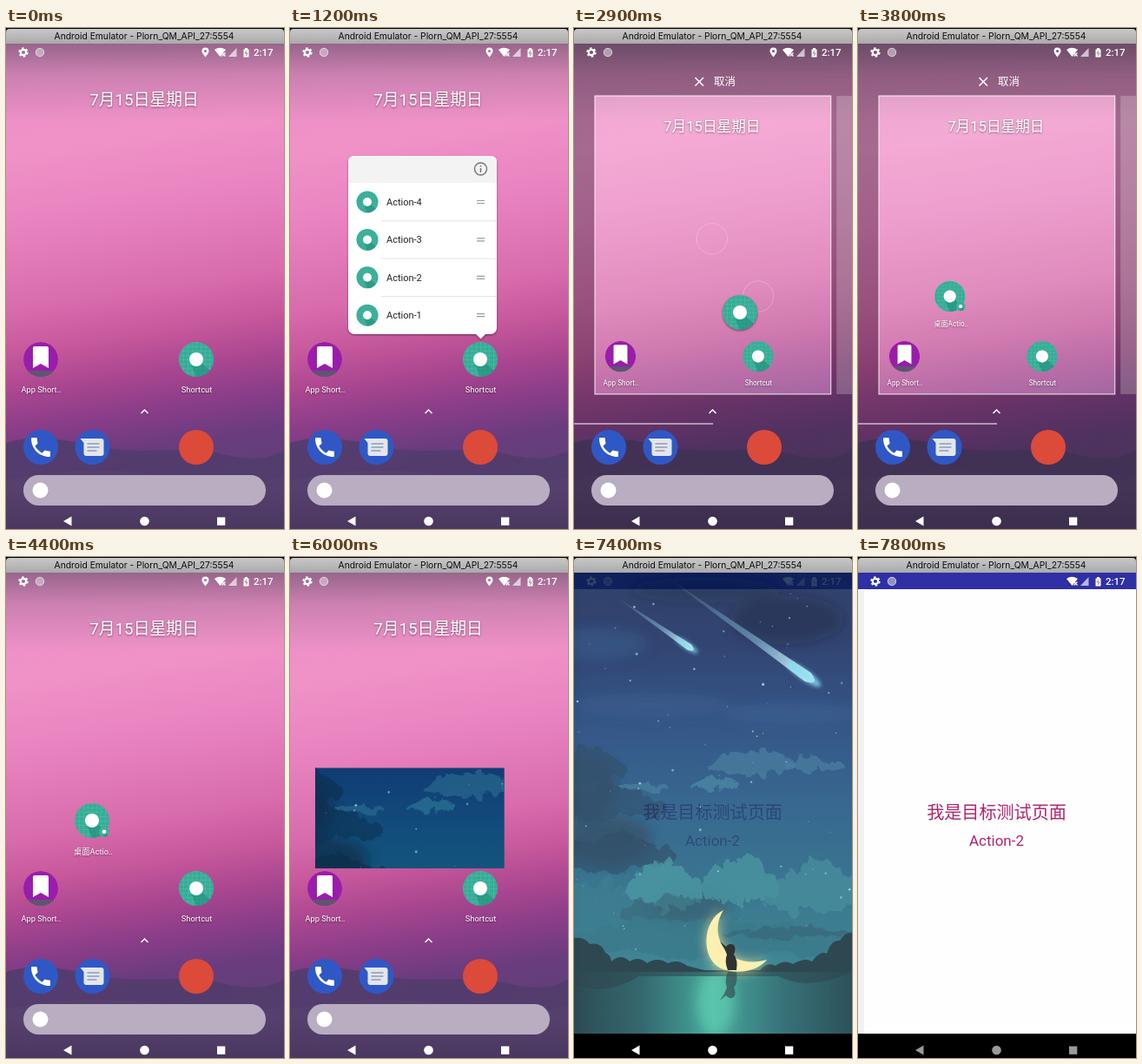
These frames come from a looping animation (320 px wide and 576 px high, 7.9 s). An HTML page:

```html
<!DOCTYPE html>
<html lang="zh-CN">
<head>
<meta charset="utf-8">
<title>Pinned shortcuts</title>
<style>
  html, body { margin: 0; width: 100%; height: 100%; overflow: hidden; background: #000; }
  svg { display: block; width: 100%; height: 100%; }
  text { font-family: Roboto, "Noto Sans CJK SC", "Noto Sans CJK", sans-serif; }
  .label { font-size: 9.3px; fill: #fff; text-anchor: middle; }
  .shade { filter: drop-shadow(0 1px 1px rgba(0,0,0,.45)); }
</style>
</head>
<body>
<svg id="stage" viewBox="0 0 320 576" preserveAspectRatio="none"></svg>
<script>
const LOOP = 7900;
const clamp = v => Math.max(0, Math.min(1, v));
const span = (t, start, length) => clamp((t - start) / length);
const smooth = p => p * p * (3 - 2 * p);
const lerp = (a, b, p) => a + (b - a) * p;
const at = (x, y, body) => `<g transform="translate(${x} ${y})">${body}</g>`;

const gradient = (id, stops, box = 'x1="0" y1="0" x2="0" y2="1"') =>
  `<linearGradient id="${id}" ${box}>${stops.map(([o, c, a = 1]) =>
    `<stop offset="${o}" stop-color="${c}" stop-opacity="${a}"/>`).join('')}</linearGradient>`;

function random(seed) {
  return () => (seed = (seed * 16807) % 2147483647) / 2147483647;
}

// Puffy cloud built from overlapping ellipses; its rim is roughened by a filter.
function cloud(x, y, w, h, color, opacity, seed) {
  const rnd = random(seed);
  let puffs = '';
  for (let i = 0; i < 9; i++) {
    const u = (i + .5) / 9, bulge = Math.sin(Math.PI * u);
    const ry = h * (.18 + .28 * bulge * (.5 + .6 * rnd()));
    puffs += `<ellipse cx="${x + w * u}" cy="${y + h * (.62 - .25 * bulge * rnd())}" rx="${w * (.07 + .07 * rnd())}" ry="${ry}"/>`;
  }
  return `<g fill="${color}" opacity="${opacity}" filter="url(#ragged)">${puffs}</g>`;
}

const defs = `<defs>
  ${gradient('wall', [[0, '#e88fc8'], [.2, '#f092c8'], [.36, '#e983c0'], [.54, '#d86cac'], [.64, '#c5579b'], [.72, '#aa4690'], [.8, '#8a3d88'], [.88, '#6a3c7e'], [1, '#5a4275']],
    'gradientUnits="userSpaceOnUse" x1="120" y1="18" x2="200" y2="540"')}
  ${gradient('topShade', [[0, '#3a3444', .46], [.4, '#3a3444', .17], [1, '#3a3444', 0]])}
  ${gradient('navShade', [[0, '#100c1c', 0], [1, '#100c1c', .16]])}
  ${gradient('bar', [[0, '#c8c8c8'], [1, '#aaaaaa']])}
  ${gradient('sky', [[0, '#0a1f4c'], [.16, '#0b2258'], [.32, '#0f3571'], [.5, '#124b7b'], [.68, '#155c7b'], [.86, '#1c7080'], [1, '#1c7080']])}
  ${gradient('water', [[0, '#062a34'], [.25, '#0e4d55'], [.5, '#24988a'], [.75, '#125860'], [1, '#06303a']], 'x1="0" y1="0" x2="1" y2="0"')}
  ${gradient('tail', [[0, '#8fd8f0', 0], [.6, '#7fc8ea', .5], [1, '#dffaff', 1]], 'x1="0" y1="0" x2="1" y2="0"')}
  <pattern id="mesh" width="5" height="5" patternUnits="userSpaceOnUse">
    <path d="M0 0H5M0 0V5" stroke="#8ad6c6" stroke-width=".6" opacity=".6"/></pattern>
  <filter id="soft" x="-50%" y="-50%" width="200%" height="200%"><feGaussianBlur stdDeviation="7"/></filter>
  <filter id="haze" x="-30%" y="-200%" width="160%" height="500%"><feGaussianBlur stdDeviation="2"/></filter>
  <filter id="ragged" x="-20%" y="-20%" width="140%" height="140%">
    <feTurbulence type="fractalNoise" baseFrequency=".06" numOctaves="3" seed="5" result="noise"/>
    <feDisplacementMap in="SourceGraphic" in2="noise" scale="16" xChannelSelector="R" yChannelSelector="G"/>
    <feGaussianBlur stdDeviation=".7"/></filter>
  <clipPath id="revealClip"><rect id="reveal"/></clipPath>
  <clipPath id="popupClip"><rect id="popupReveal" x="50" width="205"/></clipPath>
  <clipPath id="round20"><circle r="20"/></clipPath>
</defs>`;

const appIcon = (r = 20) => `<g transform="scale(${r / 20})">
  <circle r="20" fill="#36ad96"/><circle r="20" fill="url(#mesh)"/>
  <path d="M7 5L20 16V20H0L-6 6Z" fill="#1c8674" opacity=".5" clip-path="url(#round20)"/>
  <circle r="8" fill="#fff"/></g>`;

const bookmarkIcon = `<g clip-path="url(#round20)"><circle r="20" fill="#9a1cab"/>
  <rect x="-20" y="13" width="40" height="8" fill="#5c5670"/></g>
  <path d="M-7-15H7Q9-15 9-13V10L0 5L-9 10V-13Q-9-15-7-15Z" fill="#fff"/>`;

const phoneIcon = `<circle r="20" fill="#2f58c6"/>
  <path transform="translate(-14.6 -14.6) scale(1.22)" fill="#fff" d="M6.6 10.8c1.4 2.8 3.8 5.1 6.6 6.6l2.2-2.2c.3-.3.7-.4 1-.2 1.1.4 2.3.6 3.6.6.6 0 1 .4 1 1V20c0 .6-.4 1-1 1C10.6 21 3 13.4 3 4c0-.6.4-1 1-1h3.500c.6 0 1 .4 1 1 0 1.3.2 2.5.6 3.6.1.3 0 .7-.2 1z"/>`;

const messageIcon = `<circle r="20" fill="#2f58c6"/>
  <path d="M-14-10H10Q13-10 13-7V7Q13 10 10 10H-7Q-10 10-10 7V-5Z" fill="#e3e6ec"/>
  <path d="M-6-4H8M-6 0H8M-6 4H5" stroke="#a3aec6" stroke-width="2"/>`;

const statusRight = `<g fill="#fff">
  <path d="M240 25Q246 20.5 253 25L246.5 33Z"/><path d="M248.5 28.5l4 4m0-4l-4 4" stroke="#fff" stroke-width="1.3"/>
  <path d="M256 33L265.5 23V33Z" opacity=".65"/>
  <path d="M273.5 24.5H275V23H278V24.5H279.5V33.5H273.5Z"/><path d="M277 26l-2 3h3l-2 3" stroke="#765" fill="none" stroke-width=".8"/>
  <text x="285" y="32" font-size="11.5" font-weight="500">2:17</text></g>`;

const statusLeft = `<g transform="translate(20 28)" fill="none" stroke="#fff">
    <circle r="3.2" stroke-width="2.2"/>
    <circle r="4.8" stroke-width="1.8" stroke-dasharray="2.5 2.527"/></g>
  <circle cx="39" cy="28" r="5" fill="#d8d2de" opacity=".6"/><circle cx="39" cy="28" r="4.7" fill="none" stroke="#fff" stroke-width=".8" opacity=".7"/>`;

const locationPin = `<path fill="#fff" fill-rule="evenodd" d="M229.5 33.5C227 30 225.5 28.5 225.5 26.5A4 4 0 0 1 233.5 26.5C233.5 28.5 232 30 229.5 33.5ZM231 26.5A1.5 1.5 0 1 0 228 26.5A1.5 1.5 0 1 0 231 26.5Z"/>`;

const popupRows = [4, 3, 2, 1].map((n, i) => {
  const y = 200 + i * 43.4;
  return `${at(89, y, appIcon(12.5))}
    <text x="111" y="${y + 4}" font-size="11" fill="#222">Action-${n}</text>
    <path d="M215 ${y - 1.5}h9m-9 3h9" stroke="#999" stroke-width="1.2"/>
    ${i ? `<path d="M105 ${y - 21.7}H238" stroke="#e3e3e3"/>` : ''}`;
}).join('');

const popup = `<g id="popup" clip-path="url(#popupClip)"><g class="shade">
  <rect x="67" y="147" width="171" height="205" rx="7" fill="#fff"/><path d="M214 352H225L219.5 357.5Z" fill="#fff"/></g>
  <path d="M67 178V154Q67 147 74 147H231Q238 147 238 154V178Z" fill="#f3f3f3"/>
  <circle cx="219.5" cy="162" r="7" fill="none" stroke="#757575" stroke-width="1.4"/>
  <path d="M219.5 161V166M219.5 158V159.5" stroke="#757575" stroke-width="1.5"/>
  ${popupRows}</g>`;

const outlines = [[159, 228], [219, 303], [99, 303]].map(([x, y], i) =>
  `<circle id="cell${i}" cx="${x}" cy="${y}" r="20" fill="none" stroke="#fff" stroke-width="1"/>`).join('');

const home = `<rect y="18" width="320" height="558" fill="url(#wall)"/>
  <path d="M0 477C25 469 55 470 105 481S205 479 245 489S300 495 320 486V576H0Z" fill="#513c6c" opacity=".85"/>
  <path d="M0 520Q90 500 180 515T320 516V576H0Z" fill="#5b446f" opacity=".5"/>
  <rect y="18" width="320" height="90" fill="url(#topShade)"/>
  <rect y="530" width="320" height="46" fill="url(#navShade)"/>
  <path id="scrim" fill="#22202a" fill-rule="evenodd"/>
  <g id="workspace">
    <g id="panels" fill="#fff" fill-opacity=".22">
      <rect x="6.7" y="42.5" width="307" height="387.5" stroke="#fff" stroke-opacity=".85" stroke-width="1.2"/>
      <rect x="321" y="42.5" width="307" height="387.5"/>
      ${outlines}
    </g>
    <text class="shade" x="159" y="89" font-size="18.8" fill="#fff" text-anchor="middle">7月15日星期日</text>
    ${at(40, 381, bookmarkIcon)}<text class="label shade" x="40.5" y="419">App Short..</text>
    ${at(219, 381, appIcon())}<text class="label shade" x="219.5" y="419">Shortcut</text>
    <g id="pinned">${at(99, 303, appIcon())}${at(113, 316, appIcon(6))}
      <text class="label shade" x="100.5" y="342">桌面Actio..</text></g>
  </g>
  <g id="cancel"><path d="M139.5 57l9.5 9.5m0-9.5l-9.5 9.5" stroke="#fff" stroke-width="1.5"/>
    <text x="161" y="66" font-size="12.5" fill="#fff">取消</text>
    <path d="M0 455H160" stroke="#fff" stroke-width="1.2"/></g>
  <path d="M155.5 443L159.5 439L163.5 443" fill="none" stroke="#fff" stroke-width="1.5"/>
  ${at(40, 482, phoneIcon)}${at(99.5, 482, messageIcon)}
  <circle cx="219" cy="482" r="20" fill="#dc4a3a"/>
  <rect x="20" y="514" width="279" height="35" rx="17.5" fill="#b9adc1"/>
  <circle cx="39.5" cy="531.5" r="9" fill="#fff"/>
  ${statusLeft}${locationPin}${statusRight}
  ${popup}<g id="drag" class="shade">${appIcon()}</g>`;

function stars() {
  const rnd = random(4217);
  let out = '';
  for (let i = 0; i < 85; i++) {
    out += `<circle cx="${320 * rnd()}" cy="${24 + 510 * rnd()}" r="${.5 + 1.1 * rnd() ** 2}" opacity="${.25 + .5 * rnd()}"/>`;
  }
  return `<g fill="#cdeef5">${out}</g>`;
}

function meteor(x1, y1, x2, y2, width) {
  const length = Math.hypot(x2 - x1, y2 - y1);
  const angle = Math.atan2(y2 - y1, x2 - x1) * 180 / Math.PI;
  return `<g transform="translate(${x1} ${y1}) rotate(${angle})">
    <path d="M0 0L${length - width * 2} ${-width}Q${length + width} 0 ${length - width * 2} ${width}Z" fill="url(#tail)"/>
    <ellipse cx="${length - width * 3}" rx="${width * 4}" ry="${width}" fill="#6fd8ee" opacity=".8" filter="url(#haze)"/></g>`;
}

const hills = 'M0 477V438Q12 436 18 445Q32 442 36 455Q42 457 43 465Q54 455 64 465Q74 458 84 467Q96 459 108 467Q120 462 130 470L150 475H214Q222 465 232 470Q242 462 252 468Q266 460 274 465Q284 452 291 456Q296 440 306 441Q312 431 320 432V477Z';
const moon = 'M172 406C148 417 145 461 169 473C190 481 213 475 222 463C206 468 186 466 175 453C163 438 163 420 172 406Z';
const figure = 'M168 442L175 448Q178 443 184 446Q187 451 184 457Q189 463 187 475H177Q173 465 176 457L173 450Z';

const night = `<rect y="18" width="320" height="530" fill="url(#sky)"/>
  <g filter="url(#soft)" fill="#06133a">
    <ellipse cx="245" cy="72" rx="65" ry="28" opacity=".8"/><ellipse cx="150" cy="38" rx="85" ry="15" opacity=".55"/>
    <ellipse cx="25" cy="100" rx="60" ry="18" fill="#15427a" opacity=".5"/>
    <ellipse cx="90" cy="170" rx="90" ry="14" fill="#14427f" opacity=".5"/>
    <ellipse cx="250" cy="180" rx="80" ry="12" fill="#144684" opacity=".5"/>
    <ellipse cx="10" cy="265" rx="40" ry="38" fill="#0d2b4d" opacity=".8"/>
    <ellipse cx="40" cy="325" rx="50" ry="28" fill="#0c2f4e" opacity=".8"/>
    <ellipse cx="135" cy="400" rx="45" ry="20" fill="#0f3f58" opacity=".7"/></g>
  ${cloud(-20, 215, 75, 45, '#0f3153', .7, 31)}${cloud(-20, 262, 125, 45, '#0e3152', .6, 55)}${cloud(-20, 315, 130, 50, '#0c2d4b', .6, 71)}
  ${cloud(160, 217, 92, 38, '#29688f', .7, 11)}${cloud(245, 229, 62, 20, '#29688f', .7, 19)}
  ${cloud(136, 253, 54, 16, '#2c7395', .75, 23)}${cloud(58, 257, 46, 13, '#2c6c90', .7, 29)}
  ${cloud(-10, 366, 75, 60, '#1f657d', .7, 61)}${cloud(62, 345, 80, 65, '#2b8693', .8, 7)}
  ${cloud(150, 338, 80, 70, '#2b8491', .75, 43)}${cloud(220, 350, 115, 66, '#277a8b', .75, 83)}
  ${cloud(60, 385, 110, 40, '#124c62', .6, 37)}
  ${cloud(-10, 410, 340, 54, '#196173', .75, 97)}
  ${cloud(180, 424, 150, 16, '#124a62', .7, 101)}
  ${stars()}
  ${meteor(105, 22, 279, 145, 6)}${meteor(47, 45, 139, 108, 3.8)}
  <rect y="475" width="320" height="73" fill="url(#water)"/>
  <ellipse cx="163" cy="512" rx="22" ry="38" fill="#4cd0a8" opacity=".6" filter="url(#soft)"/>
  <path d="${hills}" fill="#062530"/>
  <path d="M0 477H320Q270 500 235 482H75Q40 505 0 492Z" fill="#062530" opacity=".6"/>
  <path d="${moon}" fill="#f5e98a" opacity=".8" filter="url(#soft)"/>
  <path d="${moon}" fill="#fbeea0"/>
  <path d="${figure}" fill="#090b0c"/>
  <path d="${figure}" transform="matrix(1 0 0 -1 0 952)" fill="#0a2c30" opacity=".7"/>`;

const page = `<rect y="18" width="320" height="20" fill="#2f2fa6"/>
  <rect y="37" width="320" height="511" fill="#fefefe"/><rect y="38" width="7" height="510" fill="#f2f2f2"/>
  ${statusLeft}${statusRight}
  <g fill="#b0246c" text-anchor="middle"><text x="159.5" y="301" font-size="20.1">我是目标测试页面</text>
  <text x="159.5" y="332" font-size="17">Action-2</text></g>`;

const frame = `<path d="M0 0H320V18H0Z" fill="#000"/>
  <path d="M0 18V5Q0 1 4 1H316Q320 1 320 5V18Z" fill="url(#bar)"/>
  <text x="159" y="13" font-size="10.3" fill="#0c0c0c" text-anchor="middle" style="font-family:Inter,sans-serif">Android Emulator - Plorn_QM_API_27:5554</text>
  <rect id="navBack" y="548" width="320" height="28" fill="#000"/>
  <g id="nav"><path d="M66 567L75.5 561.5V572.5Z"/><circle cx="159.5" cy="567" r="5.3"/><rect x="243" y="562.5" width="9.3" height="9.3"/></g>`;

document.getElementById('stage').innerHTML = `${defs}${home}
  <g id="splash" clip-path="url(#revealClip)"><g id="scene">${night}</g></g>
  <g id="page">${page}</g>${frame}`;

const parts = {};
document.querySelectorAll('[id]').forEach(node => parts[node.id] = node);
function set(id, attributes) {
  for (const key in attributes) parts[id].setAttribute(key, attributes[key]);
}
const show = (id, opacity) => set(id, { opacity, display: opacity > 0 ? 'inline' : 'none' });

// Time and position of the dragged icon.
const dragPath = [[2250, 140, 287], [2550, 161, 255], [2900, 191, 327], [3450, 112, 312], [3750, 106, 308]];
function dragPoint(t) {
  const i = Math.max(1, dragPath.findIndex(p => p[0] >= t));
  const [a, b] = [dragPath[i - 1], dragPath[i]];
  const p = smooth(span(t, a[0], b[0] - a[0]));
  return [lerp(a[1], b[1], p), lerp(a[2], b[2], p)];
}

function drawHome(t) {
  const open = smooth(span(t, 750, 250)), close = span(t, 2250, 150);
  const top = lerp(357, 140, open);
  set('popupReveal', { y: top, height: 362 - top });
  show('popup', Math.min(1, open * 2) * (1 - close));

  const edit = smooth(span(t, 2300, 250)) * (1 - smooth(span(t, 3800, 280)));
  const scale = lerp(1, .885, edit), dx = 18.1 * edit, dy = 40.4 * edit;
  set('workspace', { transform: `translate(${dx} ${dy}) scale(${scale})` });
  const px = x => x * scale + dx, py = y => y * scale + dy;
  set('scrim', { d: `M0 18H320V576H0ZM${px(6.7)} ${py(42.5)}H${px(313.7)}V${py(430)}H${px(6.7)}Z` });
  show('scrim', .36 * edit);
  show('panels', edit);
  show('cancel', edit);
  [2400, 2700, 3200].forEach((start, i) =>
    show('cell' + i, .35 * span(t, start, 250) * (1 - span(t, start + 450, 250))));

  const dragging = t >= 2250 && t < 3750;
  show('drag', dragging ? 1 : 0);
  if (dragging) set('drag', { transform: `translate(${dragPoint(t)})` });
  show('pinned', t >= 3750 ? 1 : 0);
}

function drawLaunch(t) {
  const wide = 1 - (1 - span(t, 5905, 200)) ** 1.55;
  const tall = smooth(span(t, 5905, 380));
  const left = lerp(80, 0, wide), top = lerp(285, 18, tall);
  set('reveal', { x: left, y: top, width: lerp(118, 320, wide) - left, height: lerp(322, 548, tall) - top });
  set('scene', { transform: `translate(0 ${30 * (1 - tall)})` });
  show('splash', t >= 5905 ? 1 : 0);
  show('navBack', span(t, 6150, 130));

  const enter = smooth(span(t, 7350, 200));
  show('page', enter);
  set('nav', { fill: enter > .5 ? '#9a9a9a' : '#fff' });
}

function draw(now) {
  const t = now % LOOP;
  drawHome(t);
  drawLaunch(t);
}

const began = performance.now();
function tick() {
  draw(performance.now() - began);
  requestAnimationFrame(tick);
}
draw(0);
requestAnimationFrame(tick);
</script>
</body>
</html>
```
